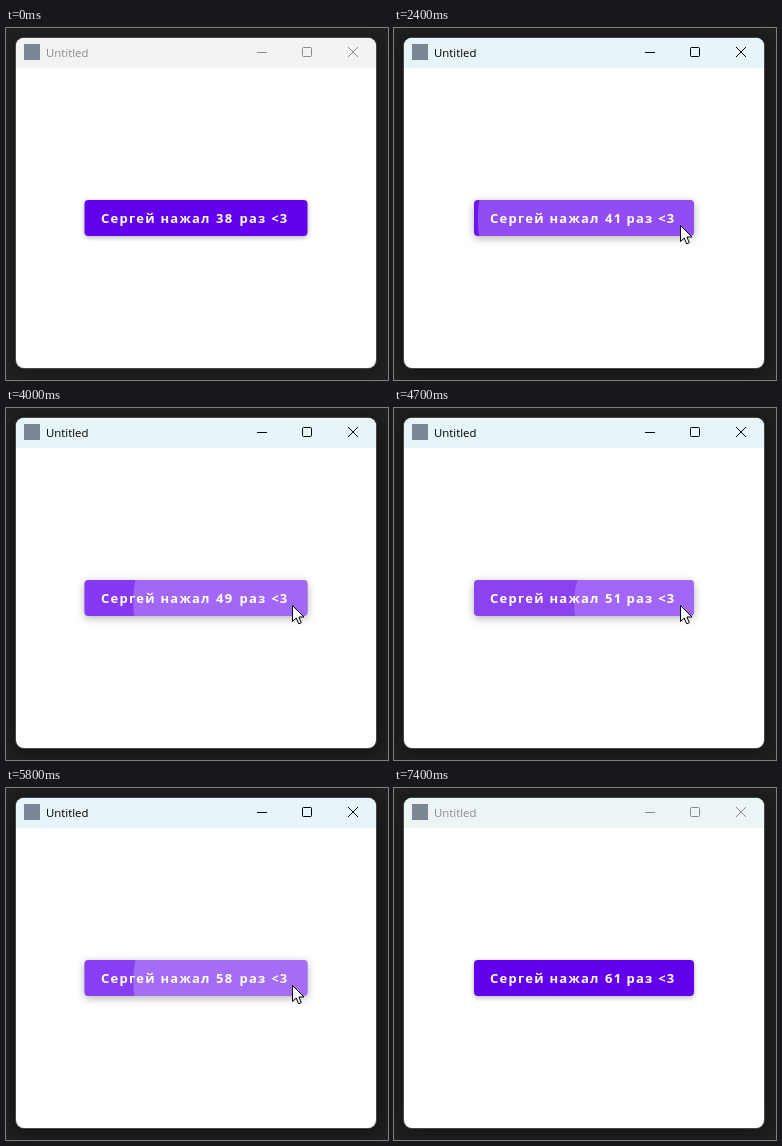
Write an HTML page with a canvas that moves like this. It is 382 px wide and 352 px high and loops after 7500 ms.

```html
<!DOCTYPE html>
<html lang="ru">
<head>
<meta charset="utf-8">
<title>Untitled</title>
<style>
  html, body { margin: 0; width: 100%; height: 100%; overflow: hidden; background: #202020; }
  canvas { display: block; }
</style>
</head>
<body>
<canvas id="stage" width="382" height="352"></canvas>
<script>
const ctx = document.getElementById('stage').getContext('2d');
const LOOP = 7500;
const FONT = '"Open Sans", "Noto Sans", sans-serif';
const FIRST = 38;
const HOVER_IN = 390, HOVER_OUT = 6440;
const FOCUS_IN = 480, FOCUS_OUT = 7350;

// One long press, then bursts of quick clicks ending at a given time.
const burst = (last, clicks, gap) => Array.from({ length: clicks }, (_, i) => {
  const down = last - (clicks - 1 - i) * gap;
  return { down, up: down + 50 };
});
const presses = [
  { down: FOCUS_IN, up: 1690 },
  ...burst(2990, 6, 195),
  ...burst(3888, 4, 165),
  ...burst(4642, 2, 190),
  ...burst(5688, 7, 150),
  ...burst(6200, 3, 170),
];

const clamp = v => Math.max(0, Math.min(1, v));
const mix = (a, b, k) => a + (b - a) * k;
const ramp = (t, from, ms) => clamp((t - from) / ms);
const white = a => `rgba(255,255,255,${a})`;

// cubic-bezier(.4, 0, .2, 1)
function ease(x) {
  let lo = 0, hi = 1, s = .5;
  for (let i = 0; i < 16; i++) {
    s = (lo + hi) / 2;
    const v = 1.2 * s * (1 - s) ** 2 + .6 * s * s * (1 - s) + s ** 3;
    if (v < x) lo = s; else hi = s;
  }
  return s * s * (3 - 2 * s);
}

function box(x, y, w, h, r) {
  ctx.beginPath();
  ctx.roundRect(x, y, w, h, r);
}

function shadow(alpha, blur, dy) {
  ctx.shadowColor = `rgba(0,0,0,${alpha})`;
  ctx.shadowBlur = blur;
  ctx.shadowOffsetY = dy;
}

function label(text, x, y, font, color, spacing) {
  ctx.font = font;
  ctx.fillStyle = color;
  ctx.letterSpacing = spacing + 'px';
  ctx.fillText(text, x, y);
}

function drawWindow(t) {
  const active = t >= FOCUS_IN && t < FOCUS_OUT;
  const tint = ramp(t, FOCUS_IN, 150) - ramp(t, FOCUS_OUT, 130);
  ctx.fillStyle = '#202021';
  ctx.fillRect(0, 0, 382, 352);

  ctx.save();
  shadow(mix(.25, .5, tint), 22, 3);
  ctx.fillStyle = '#454848';
  box(9, 9, 362, 332, 9);
  ctx.fill();
  ctx.restore();
  ctx.fillStyle = '#fff';
  box(10, 10, 360, 330, 8);
  ctx.fill();

  ctx.fillStyle = `rgb(${mix(243, 232, tint)},${mix(243, 245, tint)},${mix(243, 248, tint)})`;
  box(10, 10, 360, 30, [8, 8, 0, 0]);
  ctx.fill();

  ctx.fillStyle = '#7c8794';
  ctx.fillRect(18, 16, 16, 16);

  const ink = active ? '#000' : '#8c8c8c';
  label('Untitled', 40, 29, '11.4px ' + FONT, ink, 0);
  ctx.strokeStyle = ink;
  ctx.lineWidth = 1;
  ctx.beginPath();
  ctx.moveTo(251, 24.5); ctx.lineTo(261, 24.5);
  ctx.moveTo(342, 19); ctx.lineTo(352, 29);
  ctx.moveTo(352, 19); ctx.lineTo(342, 29);
  ctx.stroke();
  box(296.5, 19.5, 9, 9, 1);
  ctx.stroke();
}

function drawRipple(t, { down, up }, width) {
  const fade = Math.max(down + 225, up);
  if (t < down || t > fade + 150) return;
  const p = ramp(t, down, 225);
  const alpha = .24 * ramp(t, down, 75) * (1 - ramp(t, fade, 150));
  const radius = mix(width * .3, Math.hypot(width, 36) / 2 + 10, ease(p));
  ctx.fillStyle = white(alpha);
  ctx.beginPath();
  ctx.arc(mix(286, 190, p), mix(197, 190, p), radius, 0, Math.PI * 2);
  ctx.fill();
}

function drawButton(t) {
  const count = FIRST + presses.filter(p => t >= p.up).length;
  const narrow = String(count).includes('1');
  const width = narrow ? 220 : 223, left = 190 - width / 2;
  const shift = narrow ? 1 : 0;
  const hover = ramp(t, HOVER_IN, 45) - ramp(t, HOVER_OUT, 150);
  const lift = ramp(t, 1850, 150) - ramp(t, HOVER_OUT, 150);

  ctx.save();
  shadow(.3, mix(5, 8, lift), mix(1.5, 2.2, lift));
  ctx.fillStyle = '#6200ee';
  box(left, 172, width, 36, 4);
  ctx.fill();
  ctx.restore();

  ctx.save();
  box(left, 172, width, 36, 4);
  ctx.clip();
  ctx.fillStyle = white(.08 * hover);
  ctx.fillRect(left, 172, width, 36);
  presses.forEach(p => drawRipple(t, p, width));
  ctx.restore();

  const font = '700 13px ' + FONT;
  label('Сергей нажал', 95 + shift, 195, font, '#fff', 1.25);
  label(String(count), 210 + shift, 195, font, '#fff', 1.25);
  label('раз <3', 233.5 - shift, 195, font, '#fff', 1.25);
}

// The pointer comes in from the lower right, rests, and leaves over the top.
function drawPointer(t) {
  if (t < 100 || t > 6760) return;
  const enter = Math.sin(ramp(t, 100, 380) * Math.PI / 2);
  const leave = ramp(t, 6320, 440) ** 1.6;
  const x = mix(mix(360, 286, enter), 322, leave);
  const y = mix(mix(319, t < 1800 ? 196 : 197, enter), -24, leave);
  ctx.save();
  ctx.translate(x + .5, y + .5);
  ctx.beginPath();
  [[0, 0], [0, 16], [3.7, 12.5], [6.2, 18.3], [8.8, 17.2], [6.4, 11.5], [11.5, 11.5]]
    .forEach(p => ctx.lineTo(...p));
  ctx.closePath();
  ctx.fillStyle = '#fff';
  ctx.strokeStyle = '#000';
  ctx.lineWidth = 1;
  ctx.fill();
  ctx.stroke();
  ctx.restore();
}

function draw(t) {
  drawWindow(t);
  drawButton(t);
  drawPointer(t);
}

const start = performance.now();
function frame() {
  draw((performance.now() - start) % LOOP);
  requestAnimationFrame(frame);
}
frame();
</script>
</body>
</html>
```
